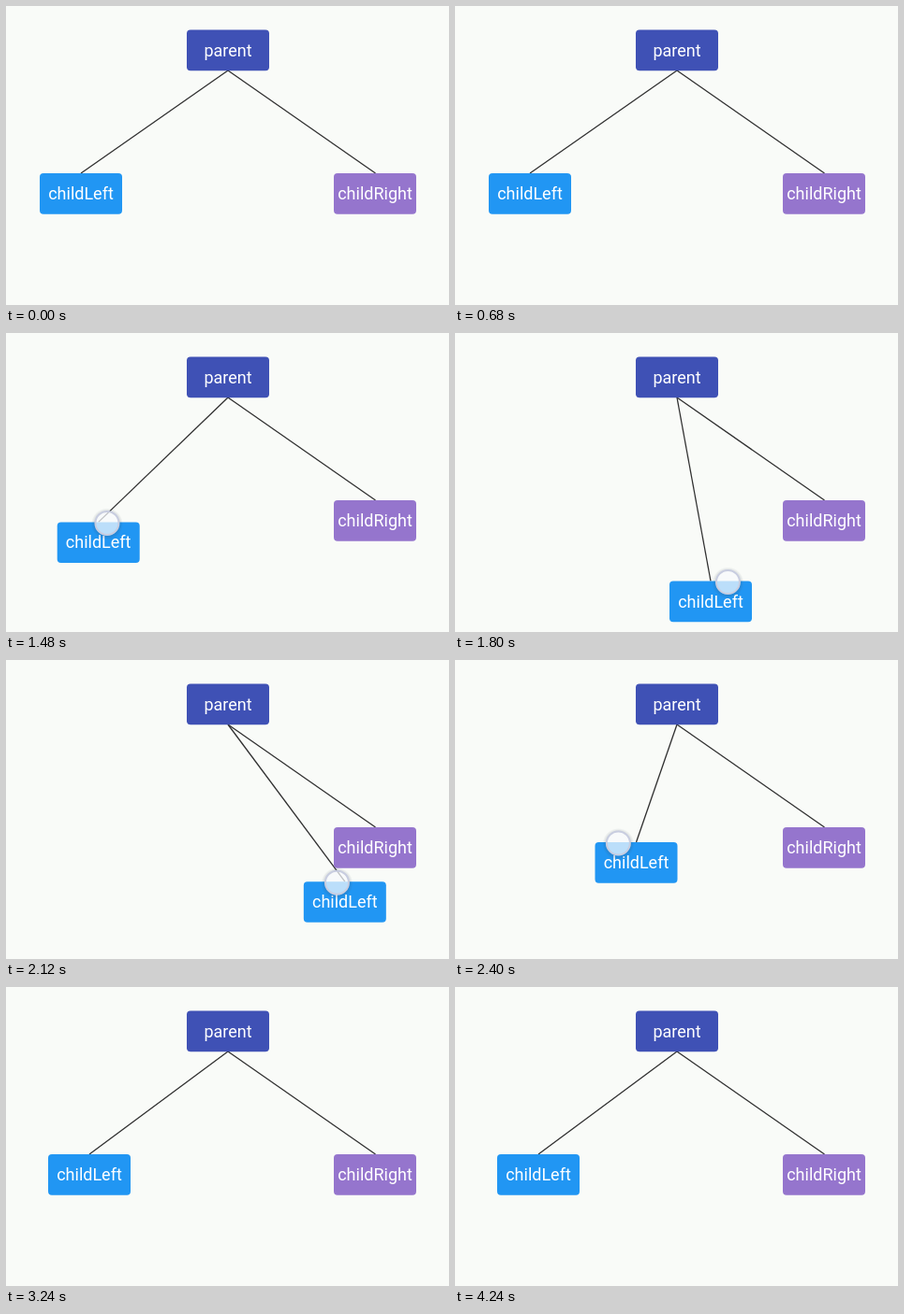
Recreate the animation shown at these times as an HTML page. Size 473x320 px, loop 4720 ms.

```html
<!DOCTYPE html>
<html lang="en">
<head>
<meta charset="utf-8">
<title>Draggable tree node</title>
<style>
  html, body { margin: 0; width: 100%; height: 100%; overflow: hidden; background: #f9fbf8; }
  svg { display: block; width: 473px; height: 320px; }
  text { font: 18px Roboto, sans-serif; fill: #fff; text-anchor: middle; }
  line { stroke: #303030; stroke-width: 1.3; }
</style>
</head>
<body>
<svg viewBox="0 0 473 320">
  <defs>
    <radialGradient id="shade">
      <stop offset=".74" stop-color="#345" stop-opacity="0"/>
      <stop offset=".76" stop-color="#345" stop-opacity=".2"/>
      <stop offset="1" stop-color="#345" stop-opacity="0"/>
    </radialGradient>
  </defs>
  <line id="leftLine" x1="237" y1="69"/>
  <line x1="237" y1="69" x2="394.5" y2="179"/>
  <g transform="translate(193 25.5)">
    <rect width="88" height="43.7" rx="4" fill="#3f51b5"/>
    <text x="44" y="28">parent</text>
  </g>
  <g transform="translate(350 179)">
    <rect width="88" height="43.7" rx="4" fill="#9575cd"/>
    <text x="44" y="28">childRight</text>
  </g>
  <g id="leftNode">
    <rect width="88" height="43.7" rx="4" fill="#2196f3"/>
    <text x="44" y="28">childLeft</text>
  </g>
  <g id="touch">
    <circle r="17" cy="1" fill="url(#shade)"/>
    <circle r="12.5" fill="#f6f9fc" fill-opacity=".72" stroke="#c8cde0" stroke-width="2"/>
  </g>
</svg>
<script>
const LOOP = 4720, STEP = 40, PRESS = 1200, RELEASE = 2880;
const LAG = 40; // ms the node trails the finger
const [leftLine, leftNode, touch] =
  ['leftLine', 'leftNode', 'touch'].map(id => document.getElementById(id));

// Turning points of the drag: time, x, y
const path = [
  [PRESS, 36, 179],
  [1480, 54.7, 202.4],
  [1800, 229, 265.5],
  [2060, 323, 248],
  [2280, 269, 201],
  [2400, 149.5, 195],
  [2720, 47, 181.4],
  [RELEASE, 45, 179]
];

const rate = (a, b, k) => (b[k] - a[k]) / (b[0] - a[0]);

// Harmonic mean of the neighbouring rates, so the curve never overshoots
function slope(i, k) {
  if (i === 0 || i === path.length - 1) return 0;
  const before = rate(path[i - 1], path[i], k), after = rate(path[i], path[i + 1], k);
  return before * after > 0 ? 2 * before * after / (before + after) : 0;
}

// Cubic Hermite curve through the turning points
function nodeAt(t) {
  const time = Math.min(Math.max(t, PRESS), RELEASE);
  const i = Math.max(0, path.findIndex(p => p[0] >= time) - 1);
  const a = path[i], b = path[i + 1], span = b[0] - a[0], u = (time - a[0]) / span;
  return [1, 2].map(k =>
    a[k] + (b[k] - a[k]) * u * u * (3 - 2 * u) +
    span * u * (1 - u) * (slope(i, k) * (1 - u) - slope(i + 1, k) * u));
}

function draw(now) {
  const t = Math.floor(now % LOOP / STEP) * STEP;
  const [x, y] = nodeAt(t);
  const fingerX = nodeAt(t + LAG)[0] + 44;
  leftNode.setAttribute('transform', `translate(${x} ${y})`);
  leftLine.setAttribute('x2', x + 44);
  leftLine.setAttribute('y2', y);
  touch.setAttribute('transform', `translate(${fingerX} ${y + 1})`);
  touch.setAttribute('visibility', t >= PRESS && t < RELEASE ? 'visible' : 'hidden');
}

const start = performance.now();
function tick() {
  draw(performance.now() - start);
  requestAnimationFrame(tick);
}
tick();
</script>
</body>
</html>
```
